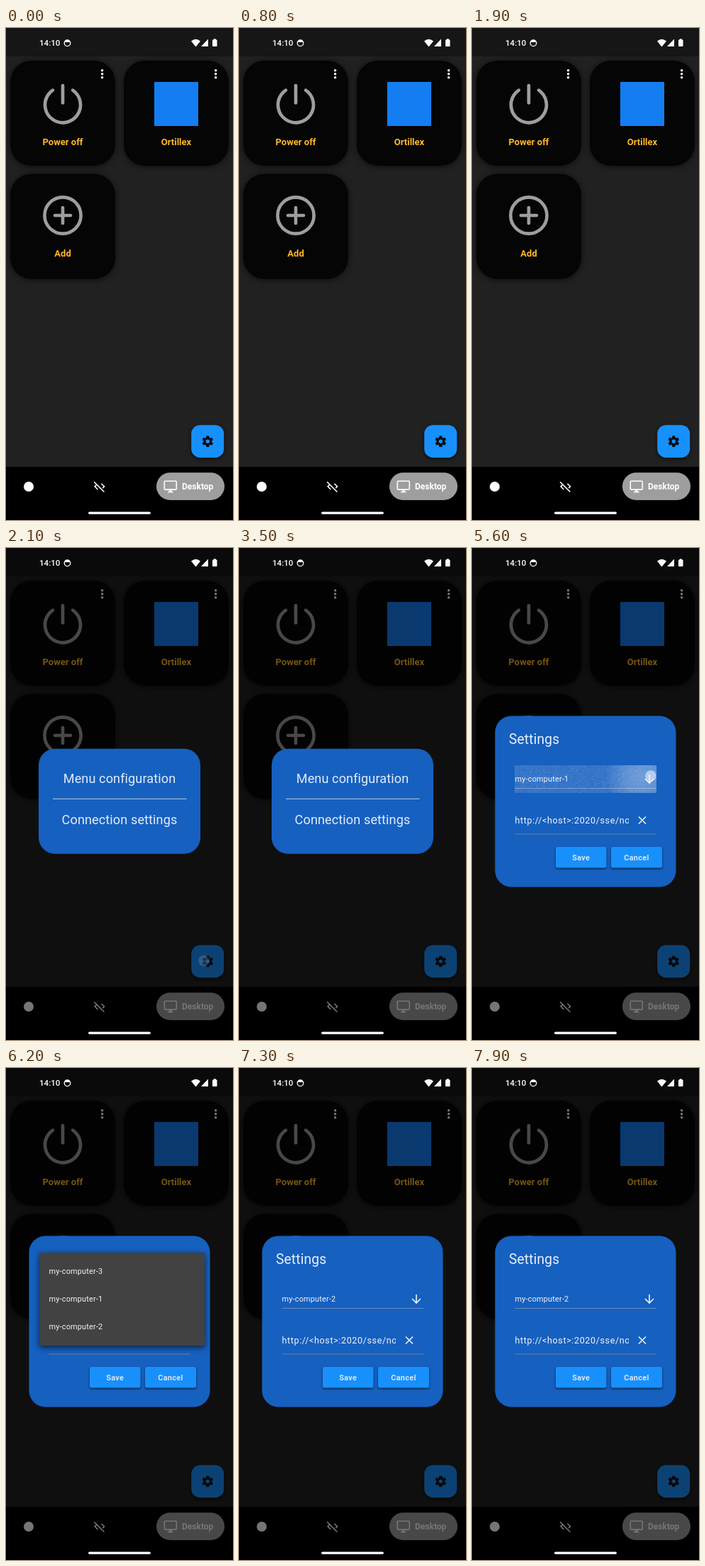
These frames come from a looping animation (320x693 px, 8000 ms). An HTML page with a canvas:

```html
<!DOCTYPE html>
<html lang="en">
<head>
<meta charset="utf-8">
<title>Remote control app</title>
<style>
  html, body { margin: 0; width: 100%; height: 100%; overflow: hidden; background: #000; }
  canvas { display: block; width: 100vw; height: 100vh; }
</style>
</head>
<body>
<canvas id="stage"></canvas>
<script>
const W = 320, H = 693, LOOP = 8000, STEP = 100;
const BLUE = '#1890fc', PANEL = '#1660c0', GRAY = '#9e9e9e', ORANGE = '#ffb928';
const canvas = document.getElementById('stage');
const ctx = canvas.getContext('2d');
const dpr = window.devicePixelRatio || 1;
canvas.width = W * dpr;
canvas.height = H * dpr;
ctx.scale(dpr, dpr);

const clamp = v => Math.max(0, Math.min(1, v));
const ramp = (t, start, length) => clamp((t - start) / length);
const easeOut = p => 1 - (1 - p) ** 3;

function layer(alpha, draw) {
  if (alpha <= 0) return;
  ctx.save();
  ctx.globalAlpha *= alpha;
  draw();
  ctx.restore();
}

function box(x, y, w, h, r, color, blur = 0, drop = 0) {
  ctx.save();
  if (blur) {
    ctx.shadowColor = 'rgba(0,0,0,.65)';
    ctx.shadowBlur = blur * dpr;
    ctx.shadowOffsetY = drop * dpr;
  }
  ctx.fillStyle = color;
  ctx.beginPath();
  ctx.roundRect(x, y, w, h, r);
  ctx.fill();
  ctx.restore();
}

function disc(x, y, r, color) {
  ctx.fillStyle = color;
  ctx.beginPath();
  ctx.arc(x, y, r, 0, 2 * Math.PI);
  ctx.fill();
}

function ring(x, y, r, width, color, from = 0, to = 2 * Math.PI) {
  ctx.strokeStyle = color;
  ctx.lineWidth = width;
  ctx.lineCap = 'round';
  ctx.beginPath();
  ctx.arc(x, y, r, from, to);
  ctx.stroke();
}

function line(points, width, color, cap = 'butt') {
  ctx.strokeStyle = color;
  ctx.lineWidth = width;
  ctx.lineCap = cap;
  ctx.beginPath();
  points.forEach(([x, y], i) => i ? ctx.lineTo(x, y) : ctx.moveTo(x, y));
  ctx.stroke();
}

function shape(path, x, y, scale, color) {
  ctx.save();
  ctx.translate(x, y);
  ctx.scale(scale, scale);
  ctx.fillStyle = color;
  ctx.fill(new Path2D(path));
  ctx.restore();
}

// y is the middle of the capitals
function text(str, x, y, size, color, { weight = 400, align = 'left', spacing = 0 } = {}) {
  ctx.font = `${weight} ${size}px Roboto, sans-serif`;
  ctx.letterSpacing = spacing + 'px';
  ctx.textAlign = align;
  ctx.fillStyle = color;
  ctx.fillText(str, x, y + size * 0.355);
}

function statusBar() {
  text('14:10', 47, 21, 11.6, '#fff', { weight: 500 });
  ring(86.5, 21.3, 4.3, 1.3, '#fff');
  ctx.fillStyle = '#fff';
  ctx.beginPath();
  ctx.arc(86.5, 21.3, 4.5, Math.PI * 1.1, Math.PI * 1.9);
  ctx.fill();
  shape('M0 3Q6.5 -2.4 13 3L6.5 11Z', 261, 15.5, 1, '#fff');
  shape('M10 0V10.5H0Z', 275, 15.5, 1, '#fff');
  box(291, 16.5, 6.5, 9.5, 0.8, '#fff');
  box(292.8, 15.3, 3, 2, 0, '#fff');
}

function card(x, y, label, menu = true) {
  box(x, y, 148, 148, 30, '#050505', 9, 1);
  text(label, x + 74, y + 114.8, 13, ORANGE, { weight: 700, align: 'center' });
  if (menu) for (let i = -1; i < 2; i++) disc(x + 129.6, y + 18.7 + i * 5, 1.75, '#fff');
}

function gear(x, y) {
  ring(x, y, 4.3, 3.2, '#060b12');
  for (let i = 0; i < 6; i++) {
    const c = Math.sin(i * Math.PI / 3), s = -Math.cos(i * Math.PI / 3);
    line([[x + c * 5, y + s * 5], [x + c * 7.8, y + s * 7.8]], 4.2, '#060b12');
  }
}

function home() {
  ctx.fillStyle = '#212121';
  ctx.fillRect(0, 0, W, H);
  ctx.fillStyle = '#161616';
  ctx.fillRect(0, 0, W, 40);

  card(6, 46, 'Power off');
  ring(80, 108.3, 25, 4.7, GRAY, -Math.PI / 2 + 0.6, Math.PI * 1.5 - 0.6);
  line([[80, 81.2], [80, 105.5]], 4.7, GRAY, 'round');

  card(166, 46, 'Ortillex');
  box(209, 76, 62, 62, 0, '#147df2');

  card(6, 205.5, 'Add', false);
  // This card's label sits under a slightly higher icon
  box(40, 310, 80, 20, 0, '#050505');
  text('Add', 80, 317.8, 13, ORANGE, { weight: 700, align: 'center' });
  ring(80, 264, 25.6, 4.6, GRAY);
  line([[69, 264], [91, 264]], 4.6, GRAY, 'round');
  line([[80, 253], [80, 275]], 4.6, GRAY, 'round');

  box(261.2, 559.2, 46, 46, 12.5, BLUE, 5, 2);
  gear(284.3, 582.3);

  ctx.fillStyle = '#000';
  ctx.fillRect(0, 618, W, H - 618);
  disc(32, 646, 7, '#fff');
  shape('M19.17 12l-4.58-4.59L16 6l6 6-3.59 3.59L17 14.17 19.17 12zM1.39 4.22l4.19 4.19L2 12l6 6 ' +
    '1.41-1.41L4.83 12 7 9.83l12.78 12.78 1.41-1.41L2.81 2.81 1.39 4.22z', 122.5, 636.5, 0.778, '#fff');
  box(212, 626.3, 96, 38.7, 19.3, GRAY);
  ctx.strokeStyle = '#fff';
  ctx.lineWidth = 1.6;
  ctx.beginPath();
  ctx.roundRect(223.3, 638.3, 17, 11.8, 1);
  ctx.stroke();
  line([[231.8, 650], [231.8, 653.5]], 3.4, '#fff');
  line([[228, 653.6], [235.6, 653.6]], 1.6, '#fff');
  text('Desktop', 248, 645.8, 12, '#fff', { weight: 700 });
}

function menuDialog() {
  box(46, 282.7, 228, 148, 23, PANEL);
  const style = { align: 'center', spacing: 0.1 };
  text('Menu configuration', 160, 324.4, 18.1, '#e3ebf6', style);
  line([[66, 353.3], [254.5, 353.3]], 1, '#bccfe9');
  text('Connection settings', 160, 382.1, 18.1, '#e3ebf6', style);
}

function button(label, x, w) {
  box(x, 421, w, 29.5, 2.5, BLUE, 3, 1.5);
  text(label, x + w / 2, 436, 10.9, '#dce5ef', { weight: 700, align: 'center', spacing: 0.35 });
}

const option = (n, y) => text('my-computer-' + n, 60.5, y, 10.9, '#f2f4f7', { spacing: 0.19 });

function settingsDialog(selected) {
  box(32.5, 236.5, 255, 241, 23, PANEL);
  text('Settings', 52, 268.7, 19.3, '#e8eef7', { spacing: 0.1 });

  option(selected, 325.3);
  line([[250, 319], [250, 330.5]], 1.6, '#f2f4f7');
  line([[244, 325], [250, 331], [256, 325]], 1.6, '#f2f4f7');
  line([[60.5, 338.5], [260, 338.5]], 1, '#6a8dbd');

  ctx.save();
  ctx.beginPath();
  ctx.rect(58, 370, 163, 30);
  ctx.clip();
  text('http://<host>:2020/sse/notify', 60.5, 384, 12.6, '#f2f4f7', { spacing: 0.6 });
  ctx.restore();
  line([[235, 378.5], [245, 388.5]], 1.6, '#f2f4f7');
  line([[245, 378.5], [235, 388.5]], 1.6, '#f2f4f7');
  line([[60.5, 403], [260, 403]], 1, '#6c7e9c');

  button('Save', 118, 71.5);
  button('Cancel', 196, 72);
}

// Spreading highlight with fine glitter inside a rectangle
function sparkle(x, y, w, h, cx, cy, spread, alpha) {
  layer(alpha, () => {
    ctx.beginPath();
    ctx.rect(x, y, w, h);
    ctx.clip();
    const reach = 20 + spread * 200;
    disc(cx, cy, reach, 'rgba(255,255,255,.12)');
    const glow = ctx.createRadialGradient(cx - 10, cy, 0, cx - 10, cy, 20 + 32 * spread);
    glow.addColorStop(0, 'rgba(255,255,255,.3)');
    glow.addColorStop(0.5, 'rgba(255,255,255,.2)');
    glow.addColorStop(1, 'rgba(255,255,255,0)');
    ctx.fillStyle = glow;
    ctx.fillRect(x, y, w, h);
    let seed = 7;
    const random = () => (seed = seed * 16807 % 2147483647) / 2147483647;
    ctx.fillStyle = 'rgba(255,255,255,.13)';
    for (let i = 0; i < 1500; i++) {
      const px = x + random() * w, py = y + random() * h;
      if (Math.hypot(px - cx, py - cy) < reach) ctx.fillRect(px, py, 1, 1);
    }
  });
}

function touch(t, from, to, x, y, color = 'rgba(235,240,250,.6)') {
  if (t >= from && t < to) disc(x, y, 7.8, color);
}

// The list fades in, unrolls from the selected row, then shows its rows in turn
function dropdown(t) {
  const p = ramp(t, 5700, 300);
  const alpha = ramp(p, 0, 0.25) * (1 - ramp(t, 7200, 75));
  layer(alpha, () => {
    const open = easeOut(ramp(p, 0.25, 0.25));
    const top = 306 + (260 - 306) * open;
    const bottom = 345 + (391 - 345) * open;
    box(47, top, 233, bottom - top, 2, '#424242', 9, 3);
    [3, 1, 2].forEach((n, i) => {
      const start = 0.5 + (i + 1) / 9;
      layer(ramp(p, start, 1 / 6), () => option(n, 286.3 + i * 39));
    });
    sparkle(47, 345, 233, 39, 170, 365, ramp(t, 6950, 200), ramp(t, 6950, 50));
    touch(t, 7000, 7200, 170, 365);
  });
}

function homeHandle(t) {
  const dip = ramp(t, 4350, 150) * (1 - ramp(t, 4600, 700));
  const v = Math.round(255 - 178 * dip);
  box(116, 681.4, 88, 3.3, 1.65, `rgb(${v},${v},${v})`);
}

function render(t) {
  ctx.globalAlpha = 1;
  home();

  const opened = easeOut(ramp(t, 1950, 150));
  const swapped = ramp(t, 4350, 150);
  layer(opened * 0.54, () => {
    ctx.fillStyle = '#000';
    ctx.fillRect(0, 0, W, H);
  });
  touch(t, 2000, 2200, 279, 581.5, 'rgba(120,160,205,.3)');

  layer(opened * (1 - swapped), menuDialog);
  touch(t, 4400, 4500, 160, 383);

  layer(swapped, () => settingsDialog(t < 7200 ? 1 : 2));
  if (t >= 5400 && t < 6100) {
    sparkle(60, 306, 200, 39, 250, 321, ramp(t, 5400, 200),
      ramp(t, 5350, 100) * (1 - ramp(t, 5700, 400)));
  }
  touch(t, 5400, 5700, 252, 321);
  dropdown(t);

  statusBar();
  homeHandle(t);
}

// The picture advances ten times a second
function tick() {
  const t = performance.now() % LOOP;
  render(Math.floor(t / STEP) * STEP);
  requestAnimationFrame(tick);
}
tick();
</script>
</body>
</html>
```
